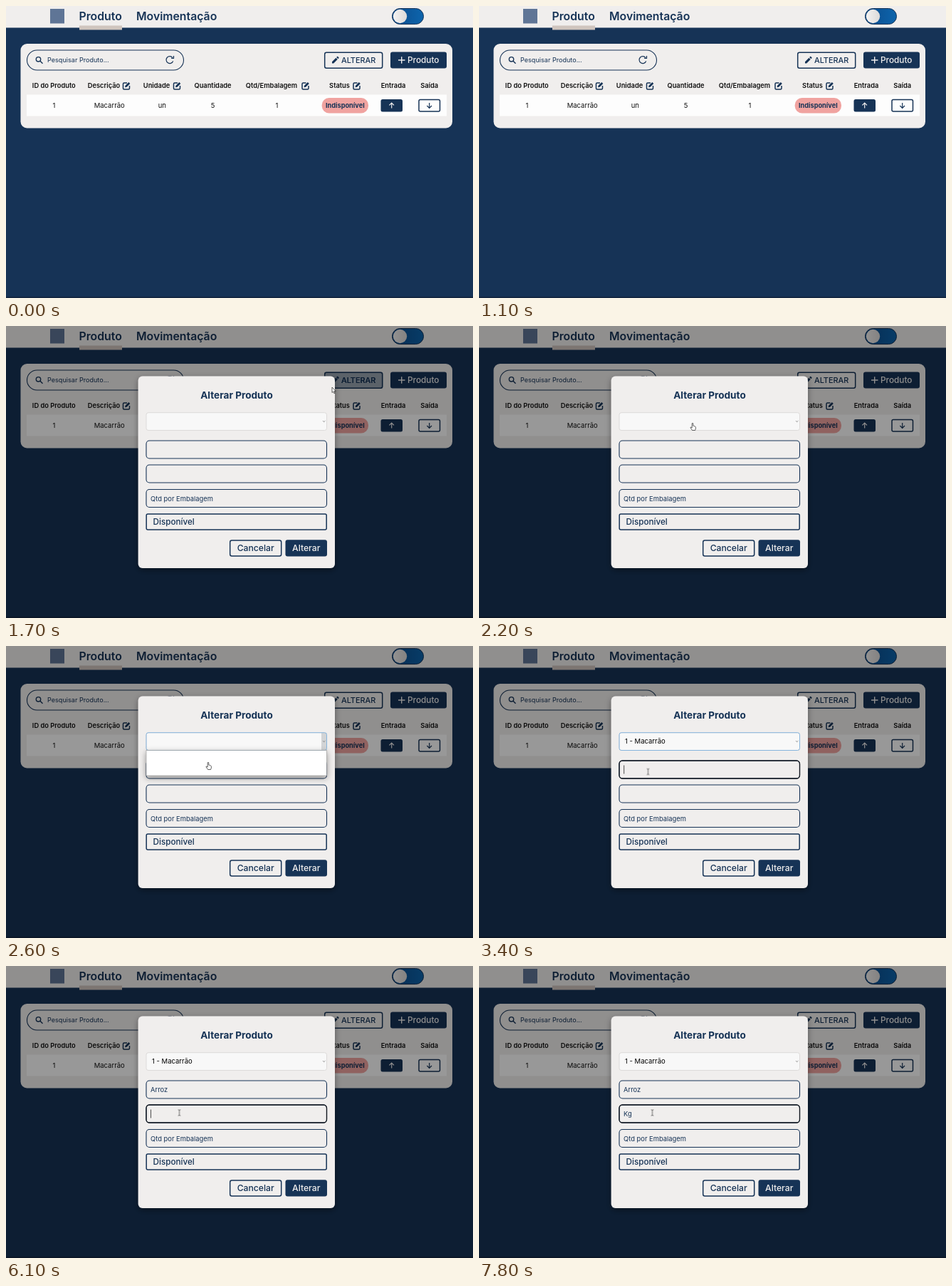
An HTML page that plays this animation: 656 by 410 pixels, repeating every 8 s.

```html
<!DOCTYPE html>
<html lang="pt-BR">
<head>
<meta charset="utf-8">
<title>Alterar Produto</title>
<style>
  html, body { margin: 0; width: 100%; height: 100%; overflow: hidden; background: #163356; }
  svg { display: block; }
  #stage { width: 100vw; height: 100vh; font-family: Poppins, Inter, sans-serif; font-size: 9.4px; --navy: #163356; --paper: #f0eeed; }
  .navy { fill: var(--navy); }
  .paper { fill: var(--paper); }
  .line { fill: none; stroke: var(--navy); }
  .thick { stroke-width: 1.5; }
  .mid { text-anchor: middle; }
  .nav { font-size: 15.8px; font-weight: 600; }
  .head { font-size: 9.3px; font-weight: 600; fill: #111; }
  .cell { font-size: 9.5px; fill: #111; }
  .button { font-size: 12.2px; font-weight: 500; }
  .focus { fill: none; stroke: #10151c; stroke-width: 1.3; }
  .caret { stroke: #222; stroke-width: .8; }

  #hover { animation: hover 8s infinite; }
  @keyframes hover {
    0%, 16.25% { opacity: 0; animation-timing-function: steps(2); }
    18.75%, 20% { opacity: 1; animation-timing-function: steps(1); }
    21.25% { opacity: .4; animation-timing-function: steps(3); }
    25%, 100% { opacity: 0; }
  }

  /* The pointer moves ten times a second. */
  #cursor { animation: travel 8s infinite steps(1); }
  @keyframes travel {
    0% { transform: translate(330px, 211px); }
    5% { transform: translate(330px, 211px); animation-timing-function: steps(9); }
    16.25% { transform: translate(459px, 91px); animation-timing-function: steps(2); }
    18.75% { transform: translate(458px, 86px); }
    21.25% { transform: translate(458px, 86px); animation-timing-function: steps(5); }
    27.5% { transform: translate(300px, 136px); animation-timing-function: steps(4); }
    32.5% { transform: translate(284px, 163px); }
    33.75% { transform: translate(281px, 170px); }
    35% { transform: translate(281px, 170px); animation-timing-function: steps(5); }
    41.25% { transform: translate(237.5px, 176.5px); }
    70% { transform: translate(237.5px, 176.5px); animation-timing-function: steps(5); }
    76.25%, 100% { transform: translate(243.5px, 206px); }
  }
</style>
</head>
<body>
<svg id="stage" viewBox="0 0 656 410" preserveAspectRatio="none">
  <defs>
    <linearGradient id="blue"><stop stop-color="#0b4a8a"/><stop offset="1" stop-color="#0d65ad"/></linearGradient>
    <linearGradient id="knob"><stop stop-color="#f4f2f1"/><stop offset="1" stop-color="#dcdad9"/></linearGradient>
    <g id="edit">
      <path class="line" stroke-width="1.5" d="M1-4h-4q-1.500 0-1.500 1.500v6q0 1.500 1.500 1.500h6q1.500 0 1.500-1.500V0"/>
      <path class="navy" d="M-2 2.300l.6-2.600 4.700-4.700 2 2-4.700 4.700z"/>
    </g>
    <path id="pencil" d="M-4.500 4.500v-2.200l5.500-5.500 2.200 2.200-5.500 5.500zM1.700-3.900l1-1q.5-.5 1 0l1.200 1.200q.5.500 0 1l-1 1z"/>
    <path id="up" d="M0 3.800v-7M-3.300-.300L0-3.600l3.300 3.300" fill="none" stroke-width="1.200"/>
    <filter id="shadow" x="-20%" y="-20%" width="140%" height="150%">
      <feDropShadow dx="0" dy="3" stdDeviation="4" flood-opacity=".4"/>
    </filter>
  </defs>

  <rect class="navy" width="656" height="410"/>
  <rect y="408" width="656" height="2" fill="#132742"/>

  <rect class="paper" width="656" height="30.5"/>
  <rect x="62" y="4" width="20" height="20.500" fill="#5f7596"/>
  <rect x="103" y="27.500" width="60" height="6" fill="#d0c5be"/>
  <g class="nav navy">
    <text x="102.500" y="20">Produto</text>
    <text x="183" y="20">Movimentação</text>
  </g>
  <rect x="542.500" y="3.500" width="44" height="22" rx="11" fill="url(#blue)" stroke="#163356"/>
  <circle cx="553.500" cy="14.500" r="9.700" fill="url(#knob)"/>

  <rect class="paper" x="20.500" y="53" width="606.500" height="118.500" rx="9"/>
  <rect class="line" x="29.500" y="62" width="220" height="28" rx="14" stroke-width="1.100"/>
  <g class="line" stroke-width="1.400">
    <circle cx="45.500" cy="74.800" r="3.200"/>
    <path d="M48 77.300l3.500 3.500"/>
    <path d="M234.700 77.500a5 5 0 1 1-.7-5M235.500 70v3.400h-3.400" stroke-width="1.200"/>
  </g>
  <text class="navy" x="58" y="79.300" font-size="9.100">Pesquisar Produto...</text>

  <g class="button">
    <rect class="line thick" x="447.700" y="65.200" width="81" height="22" rx="2.500"/>
    <use href="#pencil" class="navy" x="462.500" y="76"/>
    <text class="navy" x="471" y="80.200" font-size="10.900">ALTERAR</text>
    <g id="hover">
      <rect class="navy" x="447" y="64.500" width="82.400" height="23.400" rx="3"/>
      <g class="paper" data-show="1300-1700">
        <use href="#pencil" x="462.500" y="76"/>
        <text x="471" y="80.200" font-size="10.900">ALTERAR</text>
      </g>
    </g>
    <g class="navy" data-show="1700-2100">
      <use href="#pencil" x="462.500" y="76"/>
      <text x="471" y="80.200" font-size="10.900">ALTERAR</text>
    </g>
    <rect class="navy" x="540" y="64.500" width="79" height="23" rx="3"/>
    <path d="M551 76h9.500M555.700 71.300v9.500" stroke="#f0eeed" stroke-width="1.400"/>
    <text class="paper" x="564" y="80.300" font-size="11.800">Produto</text>
  </g>

  <g class="head">
    <text class="mid" x="67.300" y="115.200">ID do Produto</text>
    <text class="mid" x="137.500" y="115.200">Descrição</text>
    <text class="mid" x="211.500" y="115.200">Unidade</text>
    <text class="mid" x="290.500" y="115.200">Quantidade</text>
    <text class="mid" x="373" y="115.200">Qtd/Embalagem</text>
    <text class="mid" x="468.500" y="115.200">Status</text>
    <text class="mid" x="544" y="115.200">Entrada</text>
    <text class="mid" x="594.700" y="115.200">Saída</text>
  </g>
  <use href="#edit" x="169" y="112"/>
  <use href="#edit" x="240" y="112"/>
  <use href="#edit" x="420.500" y="112"/>
  <use href="#edit" x="492.500" y="112"/>

  <rect x="29" y="124.500" width="590" height="30" fill="#fdfdfd"/>
  <g class="cell mid">
    <text x="67.500" y="143">1</text>
    <text x="145.200" y="143">Macarrão</text>
    <text x="219.300" y="143">un</text>
    <text x="290.500" y="143">5</text>
    <text x="380.500" y="143">1</text>
  </g>
  <rect x="443.700" y="129" width="65.300" height="21.500" rx="10" fill="#f0a3a0"/>
  <text class="navy mid" x="476.300" y="143" font-size="9.200" font-weight="700">Indisponível</text>
  <rect class="navy" x="526.500" y="131" width="30.500" height="17.500" rx="2.500"/>
  <use href="#up" x="541.700" y="139.700" stroke="#f0eeed"/>
  <rect class="line thick" x="580" y="131.500" width="29.500" height="16.500" rx="2"/>
  <use href="#up" transform="translate(594.700 139.700) scale(1 -1)" stroke="#163356"/>

  <g data-show="1700-8000">
    <rect width="656" height="410" fill-opacity=".4"/>
    <rect class="paper" x="185.700" y="70.500" width="276.300" height="269.500" rx="6" filter="url(#shadow)"/>
    <text class="navy mid" x="324" y="102" font-size="13.600" font-weight="700">Alterar Produto</text>

    <rect x="197" y="121.700" width="253.500" height="24.800" rx="3" fill="#f8f8f8" stroke="#dcdad9"/>
    <rect data-show="2400-2900" x="443" y="122" width="7.500" height="24" fill="#d2d4d6"/>
    <rect data-show="2400-3700" x="197" y="121.700" width="253.500" height="24.800" rx="3" fill="none" stroke="#86b4dd"/>
    <path d="M445 133l1.700 1.700 1.700-1.700" fill="none" stroke="#777" stroke-width=".8"/>
    <text data-show="0-2900" x="205" y="137.200">Selecione um Produto</text>
    <text data-show="2900-8000" x="205" y="137.200" font-size="9.500">1 - Macarrão</text>

    <g class="line" stroke-width="1.100">
      <rect x="197" y="161" width="253.500" height="25" rx="4.500"/>
      <rect x="197" y="195" width="253.500" height="25" rx="4.500"/>
      <rect x="197" y="229.500" width="253.500" height="25" rx="4.500"/>
      <rect class="thick" x="197.200" y="264" width="253" height="22" rx="2"/>
    </g>
    <rect class="focus" data-show="3300-6000" x="197" y="161" width="253.500" height="25" rx="4.500"/>
    <rect class="focus" data-show="6000-8000" x="197" y="195" width="253.500" height="25" rx="4.500"/>

    <g class="navy">
      <text data-show="0-3700" x="203" y="176.700">Descrição</text>
      <text data-show="3700-4300" x="203" y="176.700">A</text>
      <text data-show="4300-4700" x="203" y="176.700">Ar</text>
      <text data-show="4700-4800" x="203" y="176.700">Arr</text>
      <text data-show="4800-4900" x="203" y="176.700">Arro</text>
      <text data-show="4900-8000" x="203" y="176.700">Arroz</text>
      <text data-show="0-7100" x="203" y="211">Unidade</text>
      <text data-show="7100-7700" x="203" y="211">K</text>
      <text data-show="7700-8000" x="203" y="211">Kg</text>
      <text x="203" y="245.500">Qtd por Embalagem</text>
      <text x="206.500" y="279" font-size="11.700" font-weight="500">Disponível</text>
    </g>
    <g class="caret">
      <path data-show="3400-3700" d="M203.700 167.500v12"/>
      <path data-show="3700-4300" d="M211.300 167.500v12"/>
      <path data-show="4300-4700" d="M215.500 167.500v12"/>
      <path data-show="6100-6700" d="M203.500 201.500v12"/>
    </g>

    <g class="button mid">
      <rect class="line thick" x="314.700" y="301" width="72" height="22" rx="2.500"/>
      <text class="navy" x="350.700" y="316">Cancelar</text>
      <rect class="navy" x="392.500" y="300.300" width="58.500" height="23.200" rx="3"/>
      <text class="paper" x="421.700" y="316">Alterar</text>
    </g>

    <g data-show="2400-2900">
      <rect x="197" y="146.500" width="253.500" height="35.500" fill="#fff" stroke="#8a8a8a" stroke-width=".6" filter="url(#shadow)"/>
      <g data-show="0-2700">
        <rect x="197.300" y="146.500" width="253" height="17.500" fill="#1f6bcc"/>
        <text x="205" y="158.500" fill="#fff">Selecione um Produto</text>
        <text x="205" y="176.200" font-size="9.500">1 - Macarrão</text>
      </g>
      <g data-show="2700-2900">
        <rect x="197.300" y="164" width="253" height="17.700" fill="#1f6bcc"/>
        <text x="205" y="158.500">Selecione um Produto</text>
        <text x="205" y="176.200" font-size="9.500" fill="#fff">1 - Macarrão</text>
      </g>
    </g>
  </g>

  <g id="cursor" fill="#fff" stroke="#222" stroke-width=".7" stroke-linejoin="round">
    <path data-show="0-1400,1700-2200" d="M0 0v7.500l1.700-1.500 1.200 2.700 1.300-.6-1.200-2.600h2.200z"/>
    <path data-show="1400-1700,2200-2900" d="M-.8.800q.8-1.300 1.600 0v3.400q1.200-.5 1.500.4 1.100-.2 1.300.7.800 0 .8 1v1.700q-.4 1-.8 2.500h-4l-2.500-3.700q-.2-1.300 1.200-.6l.9.900z"/>
    <path data-show="2900-8000" fill="none" stroke="#444" stroke-width=".8" d="M-1.700-4.200q1.700 0 1.700 1V3.200q0 1-1.700 1M1.700-4.200q-1.700 0-1.700 1M0 3.200q0 1 1.700 1"/>
  </g>
</svg>
<script>
  const LOOP = 8000;

  // data-show lists the millisecond spans in which an element is visible.
  for (const el of document.querySelectorAll('[data-show]')) {
    const frames = [{ offset: 0, opacity: 0 }];
    for (const span of el.dataset.show.split(',')) {
      const [start, end] = span.split('-').map(Number);
      frames.push({ offset: start / LOOP, opacity: 1 }, { offset: end / LOOP, opacity: 0 });
    }
    if (frames.at(-1).offset < 1) frames.push({ offset: 1, opacity: 0 });
    const hard = frames.map(frame => ({ ...frame, easing: 'steps(1, end)' }));
    el.animate(hard, { duration: LOOP, iterations: Infinity });
  }
</script>
</body>
</html>
```
